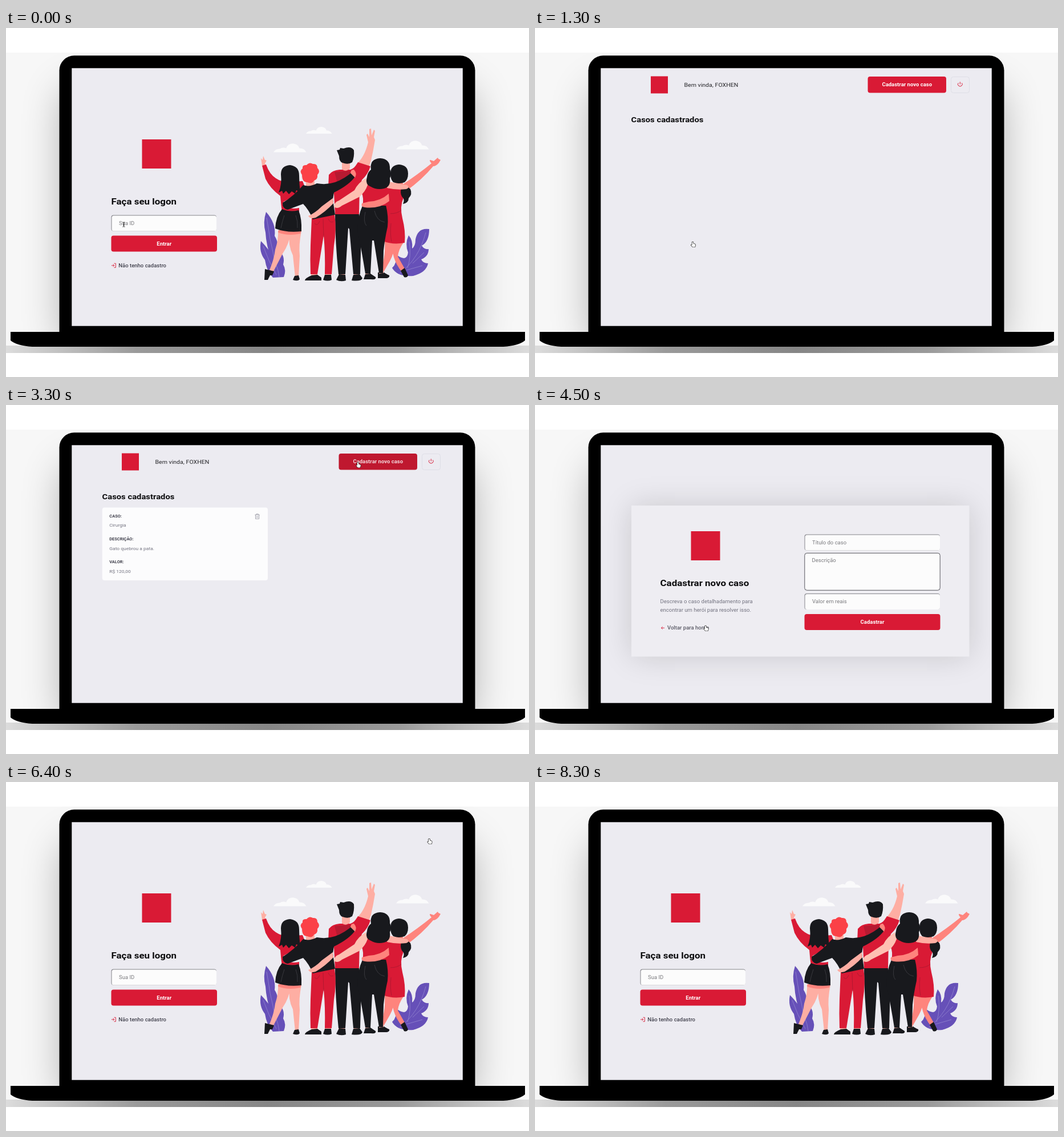
Write an HTML page with a canvas that moves like this. It is 917 px wide and 611 px high and loops after 8.5 s.

```html
<!DOCTYPE html>
<html lang="pt-BR">
<head>
<meta charset="utf-8">
<title>Logon e casos</title>
<style>
  html, body { margin: 0; width: 100%; height: 100%; overflow: hidden; background: #fff; }
  canvas { display: block; width: 917px; height: 611px; }
</style>
</head>
<body>
<canvas id="stage" width="917" height="611"></canvas>
<script>
const ctx = document.getElementById('stage').getContext('2d');
const LOOP = 8500, TICK = 100;
// The app is shown at slightly different x and y scales.
const SX = 0.5286, SY = 0.467;
const RED = '#d91a35', DARK_RED = '#bf182f', INK = '#18191d', PAGE = '#ecebf1';
const SKIN = '#feaea3', PALE = '#fec0b2', PINK = '#fe847d', PURPLE = '#6650b8', HAIR = '#fb4147';

function box(x, y, w, h, r, fill, stroke) {
  ctx.beginPath();
  ctx.roundRect(x, y, w, h, r);
  if (fill) { ctx.fillStyle = fill; ctx.fill(); }
  if (stroke) { ctx.strokeStyle = stroke; ctx.lineWidth = 1; ctx.stroke(); }
}

function text(str, x, y, size, weight, color, align = 'left') {
  ctx.save();
  ctx.translate(x, y);
  ctx.scale(SX, SY);
  ctx.font = `${weight} ${size}px Roboto, Arial, sans-serif`;
  ctx.textAlign = align;
  ctx.fillStyle = color;
  ctx.fillText(str, 0, 0);
  ctx.restore();
}

function shape(color, d) {
  ctx.fillStyle = color;
  ctx.fill(new Path2D(d));
}

function line(color, width, d) {
  ctx.strokeStyle = color;
  ctx.lineWidth = width;
  ctx.stroke(new Path2D(d));
}

function glow(color, blur, dy, draw) {
  ctx.save();
  ctx.shadowColor = color;
  ctx.shadowBlur = blur;
  ctx.shadowOffsetY = dy;
  draw();
  ctx.restore();
}

function laptop() {
  ctx.fillStyle = '#fff';
  ctx.fillRect(0, 0, 917, 611);
  ctx.save();
  ctx.beginPath();
  ctx.rect(0, 43, 917, 526);
  ctx.clip();
  ctx.fillStyle = '#f7f7f7';
  ctx.fillRect(0, 43, 917, 526);
  glow('rgba(0,0,0,.3)', 70, 24, () => box(100, 84, 717, 448, 24, '#000'));
  const floor = ctx.createLinearGradient(0, 0, 917, 0);
  floor.addColorStop(0, '#dcdcdc');
  floor.addColorStop(0.25, '#9a9a9a');
  floor.addColorStop(0.5, '#868686');
  floor.addColorStop(0.75, '#9a9a9a');
  floor.addColorStop(1, '#dcdcdc');
  ctx.fillStyle = floor;
  ctx.fillRect(0, 556, 917, 13);
  box(93.5, 48.3, 729, 500, [26, 26, 0, 0], '#000');
  shape('#000', 'M8 532H910V547Q900 556 872 558H46Q18 556 8 547Z');
  ctx.restore();
  ctx.fillStyle = PAGE;
  ctx.fillRect(115.3, 70.3, 685.5, 451.4);
}

function field(x, y, w, h) {
  box(x, y, w, h, 4, '#85858b');
  box(x + 1, y + 1, w - 1, h - 1, 3.5, '#fcfcfc');
}

function button(label, x, y, w, h, hover) {
  box(x, y, w, h, 4, hover ? DARK_RED : RED);
  text(label, x + w / 2, y + h / 2 + 3.2, 18, 700, hover ? '#f2d5da' : '#fff', 'center');
}

function mark(cx, cy, size) {
  ctx.fillStyle = RED;
  ctx.fillRect(cx - size / 2, cy - size / 2, size, size);
}

function cloud(x, y, s) {
  ctx.save();
  ctx.translate(x, y);
  ctx.scale(s, s);
  shape('#fafafb', 'M0 0Q3-6 11-6Q16-9 22-7Q25-15 34-15Q43-14 45-7Q54-7 57 0Z');
  ctx.restore();
}

function leaves() {
  shape(PURPLE, 'M456 322Q450 340 455 358Q456 380 466 408L475 400Q481 380 471 364Q474 342 456 322Z');
  shape(PURPLE, 'M447 373Q443 392 454 406Q457 426 468 437L487 436Q492 424 486 414Q490 398 478 390L468 402Q462 388 447 373Z');
  line('#9486d0', 0.8, 'M457 332Q462 370 472 410Q478 424 479 436M451 382Q460 408 474 432');
  shape(PURPLE, 'M677 420Q686 436 714 434Q737 428 740 412Q731 412 728 405Q741 400 741 387Q733 388 729 381Q742 374 742 352Q722 349 718 370Q718 382 712 386Q714 372 706 363Q699 378 705 393Q704 402 698 403Q690 402 684 396Q686 412 677 420Z');
  line('#9486d0', 0.8, 'M690 430Q724 404 736 358M704 420Q711 400 707 374M713 412L733 393M702 424L730 416');
}

function rightWoman() {
  shape(PINK, 'M664 374H682Q681 394 673 408L661 429L655 427Q666 404 664 374ZM678 374L698 374Q688 388 687 400L700 423L694 427Q674 402 678 374Z');
  shape(INK, 'M692 425L699 420L705 433Q703 438 698 436ZM652 428L661 427L671 433Q674 438 664 438H652Z');
  shape(PINK, 'M694 275Q724 255 746 237Q741 231 744 231L750 233L757 227L758 229L762 231L759 236Q754 242 749 242Q730 265 701 286L690 291ZM683 262H696V278H683Z');
  shape(RED, 'M667 282Q680 275 696 279Q700 286 697 297Q690 313 695 333Q701 356 699 376Q678 380 661 373L663 310Z');
  line('#a91930', 0.8, 'M674 325Q686 325 693 319M675 342Q673 360 676 374');
  shape(INK, 'M674 255Q674 240 689 239Q705 240 705 255Q705 265 699 270Q689 274 679 270Q674 265 674 255Z');
  shape(INK, 'M694 279Q702 275 709 282Q713 291 706 298Q706 306 696 308Q700 300 694 295Q690 287 694 279Z');
}

function tallMan() {
  shape(SKIN, 'M583 428H594V436H583ZM610 428H620V436H610Z');
  shape(INK, 'M577 325H619L623 360L621 431H609L602 352L600 350L595 431H583Q577 375 577 325Z');
  shape(INK, 'M584 431L595 432L596 442Q587 445 579 441ZM609 432L620 431L625 438Q623 444 606 442Z');
  shape(SKIN, 'M635 200L632 187L634 185L637 191L637 177L640 176L641 188L645 178L647 180L645 191L647 196Q644 215 640 232L633 253L613 240Q629 226 635 200Z');
  shape(RED, 'M566 257Q572 249 585 248H604Q611 246 617 235L639 242Q635 256 624 266L620 280L619 326H577L575 290L565 280Z');
  shape('#b61a31', 'M576 252L604 250L609 264L582 275Z');
  shape(SKIN, 'M589 234H603V246Q595 253 589 247Z');
  shape(INK, 'M580 214L585 213L586 210L592 211Q605 206 610 214Q611 226 607 235Q600 240 590 236Q584 234 584 224Z');
}

function curlyWoman() {
  shape(SKIN, 'M630 426H639V434H630ZM654 424H662V432H654Z');
  shape(INK, 'M626 309L666 310Q671 330 669 348Q664 370 662 390L661 429H654L645 372L642 372L639 430H630Q624 392 617 358Q615 332 626 309Z');
  shape(INK, 'M630 431L639 430L648 436Q650 441 640 440H627ZM653 430L661 429L672 433Q674 438 663 438H652Z');
  line('#45464b', 0.7, 'M630 322Q626 340 632 346M646 320Q650 338 664 340');
  shape(RED, 'M630 272Q640 266 668 274Q673 284 670 298L667 311H625Q628 298 623 287Z');
  shape(PALE, 'M631 263Q617 271 611 284L584 302Q575 305 575 313Q581 318 589 311L619 296Q630 287 634 275Z');
  shape(SKIN, 'M667 268Q684 272 703 275Q709 279 702 282Q684 284 668 280Z');
  shape(PINK, 'M671 290Q657 303 636 304L624 307Q622 313 629 314Q655 317 672 303Z');
  shape(INK, 'M640 248Q637 229 656 228Q674 229 673 247Q677 255 673 263Q675 278 663 281Q650 284 640 278Q629 274 633 261Q634 252 640 248Z');
}

function redhead() {
  shape(SKIN, 'M535 427H546V437H535ZM559 427H570V437H559Z');
  shape(RED, 'M536 333L576 326Q580 353 575 381L571 431H559Q560 395 557 363L546 431H534Q533 405 534 380Z');
  line('#a91930', 0.8, 'M556 334L557 366M541 342Q546 348 550 338M565 334Q568 342 574 339');
  shape(INK, 'M536 433L546 432L553 437V442H524Q524 438 536 433ZM559 432H570L571 441Q564 444 556 441Z');
  shape(SKIN, 'M526 262H541V277H526Z');
  shape(INK, 'M521 275Q532 279 545 272Q562 275 577 270Q594 264 608 251L613 259Q602 275 575 288L573 300L577 327L538 335Q531 318 521 308L494 318Q484 316 485 306Q505 294 521 275Z');
  shape(PINK, 'M604 254Q605 247 610 248Q616 254 612 262Z');
  shape(SKIN, 'M573 298L574 307Q560 322 543 332Q533 335 530 329Q542 324 554 312Z');
  shape(HAIR, 'M519 257Q514 250 520 246Q519 239 527 240Q532 234 538 238Q546 237 546 245Q552 251 546 257Q547 265 540 267Q537 274 528 270Q519 270 519 257Z');
}

function leftWoman() {
  shape(SKIN, 'M477 354L499 356Q497 378 485 395L469 426L462 424Q470 405 472 388Q478 370 477 354ZM497 356L518 355Q513 380 515 399L513 436H507L503 398Q494 380 497 356Z');
  shape(PINK, 'M478 354H518L516 360Q495 365 477 358Z');
  shape(INK, 'M454 422L462 424L470 426L467 433L463 433L459 441H453ZM506 434L513 433L515 440Q512 444 503 441Z');
  shape(SKIN, 'M449 241L447 228L450 231L451 224L454 231L457 232L454 237L456 243Z');
  shape(RED, 'M449 241L456 239Q462 256 473 263Q482 269 493 270L520 268L524 278Q508 294 487 304L485 308Q494 319 514 315V322L484 323Q482 308 481 294Q463 281 455 264Z');
  shape(INK, 'M484 317Q498 323 513 319Q519 334 518 356Q492 359 472 351Q473 330 484 317Z');
  line('#45464b', 0.7, 'M488 328Q484 340 482 350M508 328Q512 338 511 350');
  shape(INK, 'M482 256Q482 241 498 240Q514 242 514 258Q514 273 516 288L509 284L507 290L501 286L496 291L491 285L486 290L484 285L478 288Q484 274 482 256Z');
}

function illustration() {
  cloud(526, 185, 0.8);
  cloud(469, 217.5, 1.01);
  cloud(684, 212.5, 1.01);
  leaves();
  rightWoman();
  tallMan();
  curlyWoman();
  leftWoman();
  redhead();
}

function logonPage(typed, hover) {
  mark(264, 220.5, 51);
  text('Faça seu logon', 184.5, 308.5, 32, 700, '#0c0c0e');
  field(184.5, 327.5, 184.5, 28);
  text(typed || 'Sua ID', 198, 345.2, 18, 400, typed ? '#2b2b2f' : '#79797d');
  button('Entrar', 184.5, 363.5, 185.5, 28, hover === 'enter');
  line(RED, 0.9, 'M189.5 412.2H192.3V419.3H189.5M185 415.8H189.8M187.7 413.8L189.8 415.8L187.7 417.8');
  text('Não tenho cadastro', 197.3, 418.9, 18, 500, '#41414d');
  illustration();
}

function homePage(loaded, hover) {
  mark(218, 99.5, 30);
  text('Bem vinda, FOXHEN', 261.5, 102.7, 20, 400, '#222226');
  button('Cadastrar novo caso', 583.5, 85, 137.5, 28.5, hover === 'new');
  box(729.5, 85.5, 32, 28, 4, null, hover === 'power' ? '#aaaab4' : '#dedee6');
  line(RED, 1, 'M742.4 96.2A3.9 3.5 0 1 0 748.2 96.2M745.3 94.3V98.6');
  text('Casos cadastrados', 168.5, 164.6, 28, 700, '#0c0c0e');
  if (!loaded) return;
  box(168.8, 179.5, 290.2, 127.5, 4, '#fcfcfd');
  const rows = [['CASO:', 'Cirurgia'], ['DESCRIÇÃO:', 'Gato quebrou a pata.'], ['VALOR:', 'R$ 120,00']];
  rows.forEach(([label, value], i) => {
    text(label, 181.3, 196.9 + i * 40.1, 14, 700, '#41414d');
    text(value, 181.3, 213.4 + i * 40.1, 16, 400, '#737380');
  });
  line('#9c9ca8', 0.9, 'M436.3 192.3H444.8M438.8 192V190.8H442.3V192M437.5 192.5V199.3H443.7V192.5M439.6 194.5V197.5M441.6 194.5V197.5');
}

function formPage(hover) {
  glow('rgba(0,0,0,.15)', 50, 0, () => {
    ctx.fillStyle = '#eeedf2';
    ctx.fillRect(169, 176, 592.5, 264.5);
  });
  mark(299, 246.5, 51);
  text('Cadastrar novo caso', 219.5, 317, 32, 700, '#0c0c0e');
  text('Descreva o caso detalhadamento para', 219.5, 346.7, 18, 400, '#737380');
  text('encontrar um herói para resolver isso.', 219.5, 361.7, 18, 400, '#737380');
  ctx.globalAlpha = hover === 'link' ? 0.85 : 1;
  line(RED, 1, 'M227 390.3H221.3M223.8 388L221.3 390.3L223.8 392.6');
  text('Voltar para home', 232, 393.3, 18, 500, '#41414d');
  ctx.globalAlpha = 1;
  field(472.5, 226.5, 237.5, 28);
  box(472.8, 259.3, 237.4, 65, 4, '#fcfcfc', '#55555c');
  field(472.5, 330, 237.5, 28);
  text('Título do caso', 486, 243.6, 18, 400, '#79797d');
  text('Descrição', 485.5, 275.2, 18, 400, '#79797d');
  text('Valor em reais', 486, 346.9, 18, 400, '#79797d');
  button('Cadastrar', 472.5, 366, 238, 28, false);
}

// Hover zones per page: name, x, y, width, height.
const ZONES = {
  logon: [['input', 185, 328, 185, 28], ['enter', 185, 363, 185, 28]],
  home: [['new', 583, 85, 138, 28], ['power', 729, 85, 32, 28]],
  form: [['link', 220, 382, 86, 15], ['input', 473, 227, 237, 28], ['input', 473, 259, 237, 65],
    ['input', 473, 330, 237, 28], ['submit', 473, 366, 237, 28]]
};

// Pointer stops: time, x, y.
const STOPS = [
  [0, 206.5, 344], [400, 206.5, 344], [1000, 276.5, 374], [2000, 276.5, 374],
  [2100, 276, 372.5], [2600, 541.5, 104], [2700, 541.5, 104], [3000, 617, 100], [3900, 617, 100],
  [4400, 318, 396], [4500, 299, 386], [4800, 288, 389], [5400, 288, 389], [5500, 368.5, 335],
  [6200, 742, 99], [6500, 742, 99], [6600, 740.3, 103.5], [7600, 740.3, 103.5], [7800, 740.3, 83.5]
];

// Position at time t, and the time of the last movement.
function pointerAt(t) {
  const i = STOPS.findIndex(s => s[0] >= t && s[0] > 0);
  if (i < 0) return [...STOPS[STOPS.length - 1].slice(1), t];
  const [t0, x0, y0] = STOPS[i - 1], [t1, x1, y1] = STOPS[i];
  const u = (t - t0) / (t1 - t0), e = u * u * (3 - 2 * u);
  const still = x0 === x1 && y0 === y1;
  return [x0 + (x1 - x0) * e, y0 + (y1 - y0) * e, still ? t0 : t];
}

function hoverAt(page, x, y) {
  const hit = ZONES[page].find(([, zx, zy, w, h]) => x >= zx && x <= zx + w && y >= zy && y <= zy + h);
  return hit ? hit[0] : '';
}

function pointer(x, y, hover) {
  ctx.save();
  ctx.translate(x, y);
  if (hover === 'input') {
    line('#222', 1, 'M-2-4H-.8L0-3.4L.8-4H2M0-3.4V3.4M-2 4H-.8L0 3.4L.8 4H2M-1 1H1');
  } else if (hover) {
    const hand = 'M-1 1Q0 0 1 1V3.6L4.2 4.5Q5.2 5.2 4.7 7L3.8 9.4H0L-2.8 6.2Q-2.8 5-1 5.8Z';
    line('#222', 1.4, hand);
    shape('#fff', hand);
  } else {
    const arrow = 'M0 0V7.4L1.6 5.9L2.8 8.5L4 8L2.9 5.5H5Z';
    line('#fff', 0.6, arrow);
    shape('#111', arrow);
  }
  ctx.restore();
}

function pageAt(t) {
  if (t < 1300 || t >= 6400) return 'logon';
  return t >= 3400 && t < 4900 ? 'form' : 'home';
}

function draw(t) {
  const page = pageAt(t), [x, y, moved] = pointerAt(t), hover = hoverAt(page, x, y);
  laptop();
  ctx.save();
  ctx.beginPath();
  ctx.rect(115, 70, 686, 452);
  ctx.clip();
  if (page === 'logon') logonPage(t >= 200 && t < 1300 ? '0728398f' : '', hover);
  else if (page === 'form') formPage(hover);
  else homePage(t >= 1400 && t !== 4900, hover);
  // The pointer keeps its look after a page change until it moves.
  if (t < 7900) pointer(x, y, hoverAt(pageAt(moved), x, y));
  ctx.restore();
}

const start = performance.now();
function frame() {
  const t = (performance.now() - start) % LOOP;
  draw(Math.floor(t / TICK) * TICK);
  requestAnimationFrame(frame);
}
frame();
</script>
</body>
</html>
```
